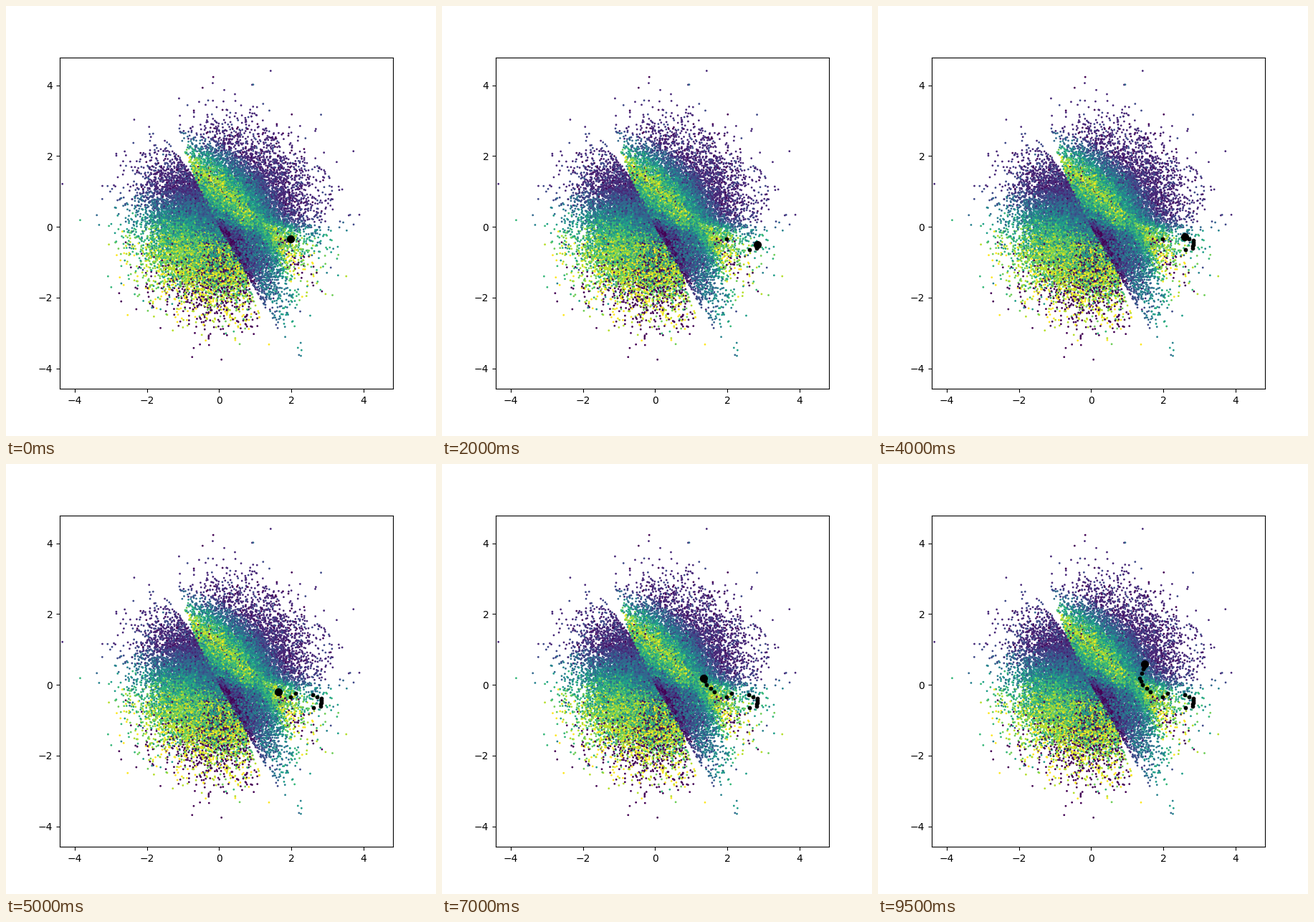
Recreate the animation shown at these times as a matplotlib script. Size 600 by 600 pixels, loop 10 s.

```python
import numpy as np
import matplotlib.pyplot as plt
from matplotlib.animation import FuncAnimation

FRAMES, INTERVAL = 20, 500
COUNT = 28000
SEAM_NORMAL = np.array([0.872, 0.489])
SEAM_AXIS = np.array([-0.489, 0.872])

# Turning points of the walk and the frames at which they are reached.
KEY_FRAMES = [0, 1, 2, 6, 8, 10, 12, 14, 16, 19]
KEY_X = [1.98, 2.60, 2.81, 2.83, 2.58, 1.64, 1.42, 1.35, 1.44, 1.47]
KEY_Y = [-0.345, -0.65, -0.61, -0.38, -0.29, -0.20, 0.0, 0.19, 0.45, 0.60]


def bump(x, y, width):
    return np.exp(-(x**2 + y**2) / width)


def sample_cloud(rng):
    """Normal cloud, leaning to the upper right and split along a seam."""
    points = rng.normal(size=(COUNT, 2))
    angle = np.arctan2(points[:, 1], points[:, 0])
    points *= (0.97 + 0.08 * np.cos(angle - np.pi / 4))[:, None]
    across, along = points @ SEAM_NORMAL, points @ SEAM_AXIS
    right = across > 0
    upper = np.maximum(along, 0)
    lower = np.maximum(-along - 1.5, 0)
    across += np.where(right, 0.04 * upper**2,
                       0.14 * upper - 0.06 * upper**2 - 0.2 * lower)
    along -= np.where(right & (across < 0.5), 0.4 * lower, 0)
    x, y = (across[:, None] * SEAM_NORMAL + along[:, None] * SEAM_AXIS).T
    return x, y, across, along, right


def sample_labels(rng, x, y, across, along, right):
    """Mean class varies smoothly on each side of the seam; noise mixes it."""
    ridge = across + 0.15 * np.maximum(along, 0) ** 2
    top = np.interp(ridge, [0, 0.75, 1.35, 1.9], [4.8, 7.6, 3.6, 1.1])
    bottom = np.interp(across, [0, 0.25, 0.8, 1.3, 2.2],
                       [0.6, 2.2, 3.2, 8.3, 5])
    bottom += 1.2 * np.maximum(-along - 1.5, 0)
    blend = 1 / (1 + np.exp(-y / 0.12))
    left_mean = np.interp(y, [-2.5, -1.4, -0.5, 0.1, 0.6, 1.1],
                          [9.5, 7.6, 6.8, 5, 3, 1.2])
    mean = np.where(right, blend * top + (1 - blend) * bottom, left_mean)
    mean = np.maximum(mean - 2 * bump(x, y, 0.3), 0.6)
    spread = 0.3 + 0.16 * mean + 1.5 * bump(x - 0.2, y + 0.8, 0.5)
    noisy = np.clip(rng.normal(mean, spread), -0.4, 10.4)
    return np.rint(noisy) % 10


rng = np.random.default_rng(7)
cloud = sample_cloud(rng)
labels = sample_labels(rng, *cloud)
walk = np.column_stack([np.interp(range(FRAMES), KEY_FRAMES, key)
                        for key in (KEY_X, KEY_Y)])

fig, ax = plt.subplots(figsize=(6, 6), dpi=100)
ax.scatter(cloud[0], cloud[1], c=labels, s=1, cmap="viridis", vmin=0, vmax=9)
trail = ax.scatter([], [], s=10, c="black")
head = ax.scatter([], [], s=50, c="black")
ax.set_xlim(-4.41, 4.81)
ax.set_ylim(-4.576, 4.786)


def update(frame):
    trail.set_offsets(walk[:frame])
    head.set_offsets(walk[frame:frame + 1])
    return trail, head


animation = FuncAnimation(fig, update, frames=FRAMES, interval=INTERVAL,
                          repeat=True, repeat_delay=0)
plt.show()
```
